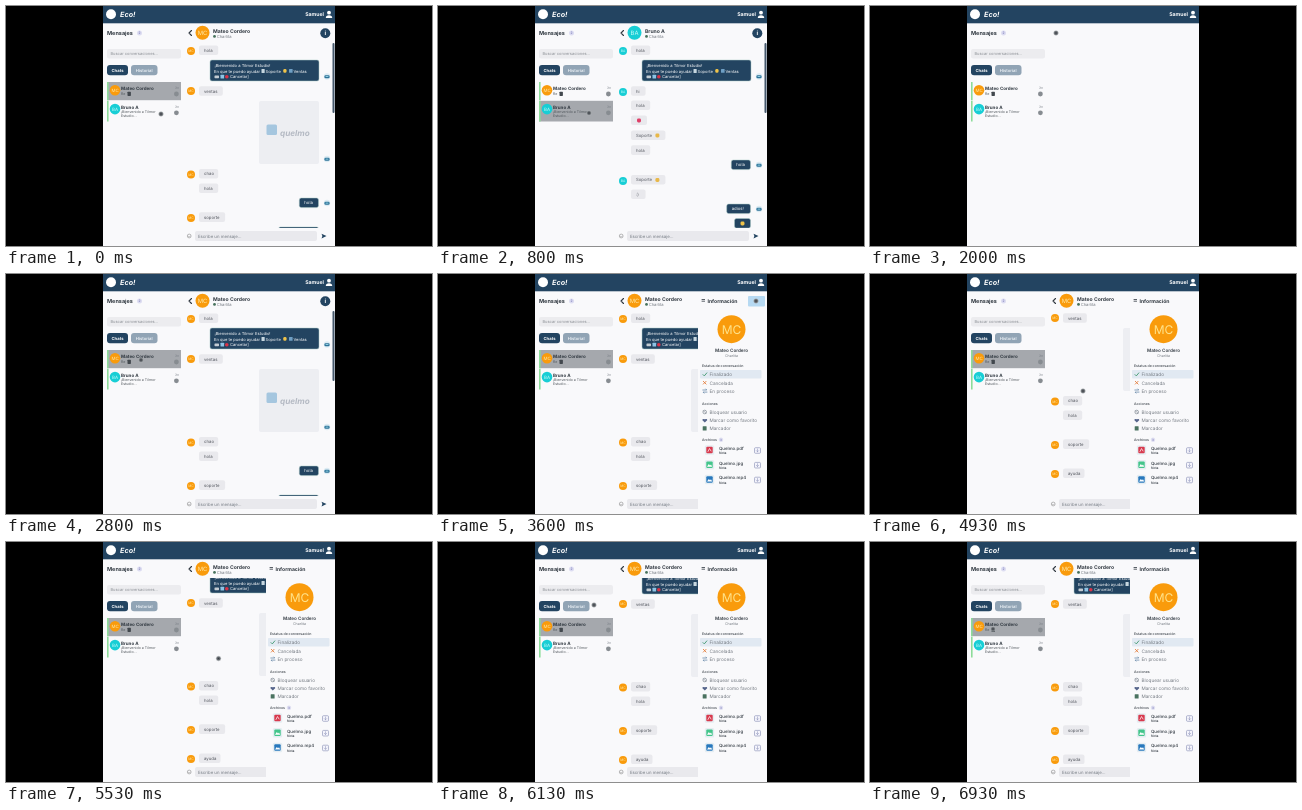
Recreate the animation shown at these times as an HTML page. Size 426 by 240 pixels, loop 6990 ms.

```html
<!DOCTYPE html>
<html lang="es">
<head>
<meta charset="utf-8">
<title>Chat</title>
<style>
html, body { margin: 0; width: 100%; height: 100%; overflow: hidden; background: #000; }
svg { display: block; width: 100%; height: 100%; }
text { font-family: Inter, Roboto, sans-serif; text-rendering: geometricPrecision; }
</style>
</head>
<body>
<svg id="stage" viewBox="0 0 426 240"></svg>
<script>
const LOOP = 6990, STEP = 1000 / 15;
const NAVY = '#234461', INK = '#303840', GREY = '#747a82', PAGE = '#f9f9fb', SOFT = '#e9e9ed';
const ORANGE = '#f99b0c', CYAN = '#18ced5';

const text = (x, y, s, size, fill = INK, weight = 400, extra = '') =>
  `<text x="${x}" y="${y}" font-size="${size}" fill="${fill}" font-weight="${weight}" ${extra}>${s}</text>`;
const rect = (x, y, w, h, fill, r = 0, extra = '') =>
  `<rect x="${x}" y="${y}" width="${w}" height="${h}" rx="${r}" fill="${fill}" ${extra}/>`;
const disc = (x, y, r, fill, extra = '') => `<circle cx="${x}" cy="${y}" r="${r}" fill="${fill}" ${extra}/>`;
const line = (d, stroke, w = 1) =>
  `<path d="${d}" fill="none" stroke="${stroke}" stroke-width="${w}" stroke-linecap="round" stroke-linejoin="round"/>`;
const group = (id, body, extra = '') => `<g id="${id}" ${extra}>${body}</g>`;
const MID = 'text-anchor="middle"', EDGE = 'stroke="#a9c9c4" stroke-width=".5"';

const people = {
  mateo: { name: 'Mateo Cordero', initials: 'MC', color: ORANGE, tint: '#ffe9a8' },
  bruno: { name: 'Bruno A', initials: 'BA', color: CYAN, tint: '#c9fbfa' }
};
const avatar = (p, x, y, r) =>
  disc(x, y, r, p.color) + text(x, y + r * .3, p.initials, r * .84, p.tint, 400, MID);

const bot = y => disc(321, y, 3.2, '#dcebf3') + rect(318.4, y - 1.3, 5.2, 3, '#2d7298', 1.3) +
  rect(319.6, y - .3, 2.8, .8, '#a9e3f1');

// The dot stands for an emoji after the label.
function bubble(y, label, right, dot) {
  const w = 10 + label.length * 2.3 + (dot ? 6 : 0);
  const x = right ? 312.5 - w : 193;
  const mark = dot ? rect(x + w - 10, y - 2, 4, 4, dot, 1.4) : '';
  return rect(x, y - 5, w, 9.6, right ? NAVY : SOFT, 2, right ? EDGE : '') +
    text(x + 5, y + 1.3, label, 4.3, right ? '#fff' : '#50545c') + mark;
}

const welcome = () => rect(204, 54, 109, 21, NAVY, 2, EDGE) +
  text(208.5, 60.5, '¡Bienvenido a Tilmor Estudio!', 4.1, '#fff') +
  text(208, 66.5, 'En que te puedo ayudar', 4.1, '#fff') + rect(255.5, 63, 3.2, 4, '#c6d6df', .5) +
  text(259.5, 66.5, 'Soporte', 4.1, '#fff') + rect(277.3, 63, 3.2, 3.8, '#efc34a', 1.3) +
  rect(283, 63, 3.6, 3.8, '#6f9fc4', .5) + text(287.5, 66.5, 'Ventas', 4.1, '#fff') +
  rect(208.5, 69.5, 4.5, 2.7, '#c3cbd2', .6) + rect(214.5, 68.8, 3.6, 3.8, '#8dc3e4', .5) +
  disc(220.8, 70.8, 1.8, '#d93347') + text(224, 72.4, 'Cancelar]', 4.1, '#fff') + bot(70.5);

const picture = () => rect(253, 95, 60, 63, '#edeef2', 2) + rect(260.5, 118.5, 10.5, 10.5, '#a5c6df', 1.5) +
  text(274, 129.5, 'quelmo', 8.2, '#b4b9c3', 700, 'font-style="italic"') + bot(153);

const header = p => line('M185.5 24.5 L183 27 L185.5 29.5', INK, 1.1) + avatar(p, 196.5, 26.7, 7) +
  text(207, 26.7, p.name, 5.1, INK, 700) + disc(208.5, 30.4, 1.4, '#46715c') + text(210.7, 31.7, 'Charlita', 4.1, GREY);

const compose = () => disc(183.2, 230, 1.9, 'none', 'stroke="#777" stroke-width=".5"') +
  line('M182.2 230.4 q1 .9 2 0', '#777', .4) + rect(189, 225, 122, 10, SOFT, 2) +
  text(192, 231.6, 'Escribe un mensaje...', 4.3, GREY) +
  `<path d="M315.5 227.7 L320.5 230 L315.5 232.4 L316.4 230 Z" fill="${NAVY}"/>`;

function chat(id, p, avatars, messages, extra) {
  const body = welcome() + extra + avatars.map(y => avatar(p, 185, y, 4)).join('') +
    messages.map(m => bubble(...m)).join('');
  return group(id, header(p) + `<g clip-path="url(#log)">${group(id + 'Log', body)}</g>` + compose() +
    disc(319.3, 27.2, 5, NAVY) + text(319.3, 29.4, 'i', 6, '#fff', 700, MID) + rect(326.5, 37, 2, 70, '#45586c', 1));
}

function row(p, id, y, h, lines) {
  return rect(101, y, 74, h, '#a5a8ad', 0, `id="${id}"`) +
    rect(101, y, 1.6, h, '#8ddc9a') + avatar(p, 109, y + 8.3, 5.3) +
    text(115, y + 7.7, p.name, 4.5, INK, 700) +
    lines.map((s, i) => text(115, y + 12.5 + i * 4, s, 3.6, '#51575d')).join('') +
    text(169, y + 7, '7m', 3, GREY) + disc(170.4, y + 12, 2.4, '#878c91');
}

const sidebar = () => text(101, 29.3, 'Mensajes', 5.5, INK, 700) + disc(133.5, 27, 2.5, '#dcdcf1') +
  text(133.5, 28.2, '2', 3.3, '#6d6db0', 400, MID) +
  rect(101, 43, 74, 9.5, '#ececef', 2) + text(104.5, 49.2, 'Buscar conversaciones...', 4, '#8b8f95') +
  rect(101, 59, 21, 10.3, NAVY, 3) + text(111.5, 65.8, 'Chats', 4.2, '#fff', 700, MID) +
  rect(125, 59, 26.5, 10.3, '#91a4b5', 3) + text(138.2, 65.8, 'Historial', 4.2, '#eef3f7', 600, MID) +
  row(people.mateo, 'pickMateo', 76, 18.2, ['Re']) + rect(121.5, 85.7, 3.4, 4.2, '#42484e', .6) +
  row(people.bruno, 'pickBruno', 94.8, 20.7, ['¡Bienvenido a Tilmor', 'Estudio...']);

const topBar = () => rect(97, 0, 232, 17.3, NAVY) + disc(105, 8.3, 5, '#fff') +
  text(114, 11.2, 'Eco!', 7.2, '#fff', 700, 'font-style="italic"') +
  text(318, 10.4, 'Samuel', 5.2, '#fff', 700, 'text-anchor="end"') + disc(323, 6.7, 1.9, '#fff') +
  '<path d="M319.8 12 q0 -2.8 3.2 -2.8 t3.2 2.8 z" fill="#fff"/>';

function file(y, ext, color) {
  const mark = ext === 'pdf' ? line(`M270 ${y + 1.5} L271.5 ${y - 1.5} L273 ${y + 1}`, '#fff', .7)
    : `<path d="M269 ${y + 2} l1.8 -2.6 l1.2 1.4 l1 -1 l1.2 2.2 z" fill="#fff"/>`;
  return rect(266.8, y - 4.7, 9.4, 9.4, '#e5edf2', 1.5) + rect(268.3, y - 3.3, 6.4, 6.6, color, 1) + mark +
    text(281, y - .2, 'Quelmo.' + ext, 4.4, INK, 500) + text(281, y + 4, 'Nota', 3.3, INK, 500) +
    rect(316.5, y - 2.3, 6, 5.6, '#f4f4fc', 1, 'stroke="#858bb2" stroke-width=".6"') +
    line(`M319.5 ${y - 1} v2.8 m-1.2 -1.2 l1.2 1.2 l1.2 -1.2`, '#858bb2', .5);
}

const options = (y, gap, labels) =>
  labels.map((s, i) => text(271.5, y + i * gap, s, 4.7, GREY)).join('');

const info = () => rect(260, 18, 69, 222, PAGE) + line('M264 25.5 h2.6 M264 27.2 h2.6', INK, .8) +
  text(269.5, 28.6, 'Información', 5.1, INK, 700) + rect(310, 22, 17, 10.5, '#b6d9f2', 1, 'id="flash"') +
  disc(293.5, 55.2, 14, ORANGE) + text(293.5, 59.5, 'MC', 12, '#ffe38b', 400, MID) +
  text(293.5, 78, 'Mateo Cordero', 4.6, INK, 600, MID) + text(293.5, 82.6, 'Charlita', 3.6, GREY, 400, MID) +
  text(264, 93.4, 'Estatus de conversación', 3.5, '#555b62', 600) + rect(262, 96, 61.5, 8.4, '#e1e9f2', 1) +
  line('M265 100.6 l1.3 1.3 l2.5 -3', '#3f9870', .9) +
  line('M265.3 107.3 l2.8 2.8 m0 -2.8 l-2.8 2.8', '#e58140', .9) +
  line('M264.8 116 h4 l-1 -1 M269 118.1 h-4 l1 1', '#587ca0', .7) +
  options(102, 8.6, ['Finalizado', 'Cancelada', 'En proceso']) +
  text(264, 130.7, 'Acciones', 3.5, '#555b62', 600) +
  disc(266.7, 138, 1.8, 'none', 'stroke="#68737e" stroke-width=".6"') + line('M265.5 136.8 l2.4 2.4', '#68737e', .5) +
  '<path d="M266.8 148.6 l-2.4 -2.4 q-.2 -2 2.4 -.9 q2.6 -1.1 2.4 .9 z" fill="#56658b"/>' +
  rect(264.7, 152.2, 3.9, 4.2, '#4a7260', .5) +
  options(139.6, 8.3, ['Bloquear usuario', 'Marcar como favorito', 'Marcador']) +
  text(264, 167, 'Archivos', 3.5, '#555b62', 600) + disc(283, 165.8, 2.2, '#dfdff1') +
  text(283, 167, '3', 3, '#6d6db0', 400, MID) +
  file(176, 'pdf', '#d83a4e') + file(190.7, 'jpg', '#43c58b') + file(205.5, 'mp4', '#2878bd');

const stage = document.getElementById('stage');
stage.innerHTML = '<clipPath id="log"><rect x="180" y="36" width="146" height="186"/></clipPath>' +
  '<clipPath id="app"><rect x="97" width="232" height="240"/></clipPath><g clip-path="url(#app)">' +
  rect(97, 0, 232, 240, PAGE) + topBar() + sidebar() +
  chat('mateo', people.mateo, [45, 85, 168.5, 212, 241],
    [[44.5, 'hola'], [85.2, 'ventas'], [168, 'chao'], [182.5, 'hola'], [197, 'hola', true],
     [211.3, 'soporte'], [226, 'Buenas tardes', true], [240.5, 'ayuda']], picture() + bot(197)) +
  chat('bruno', people.bruno, [45, 86, 175],
    [[44.5, 'hola'], [85.2, 'hi'], [99.5, 'hola'], [114.5, '', false, '#df3f68'], [129.5, 'Soporte ', false, '#e8b84a'],
     [144.3, 'hola'], [159, 'hola', true], [174, 'Soporte ', false, '#e8b84a'], [188.5, ':)'],
     [203, 'adios!', true], [217.5, '', true, '#efc34a']], bot(159) + bot(203)) +
  group('info', info()) +
  group('cursor', disc(0, 0, 2.3, '#62676c', 'stroke="#b9bcbf" stroke-width=".5"') + disc(0, 0, .8, '#383d42')) + '</g>';

// Each key is [time, ...values]; values ease between neighbouring keys.
const path = [[0, 155, 108], [800, 151, 107], [1300, 151, 107], [1800, 186, 27], [2050, 186, 27], [2600, 135, 86],
  [2900, 135, 86], [3400, 318, 27], [3700, 318, 27], [4300, 213, 117], [5500, 213, 117], [6130, 156, 63],
  [6600, 123, 87], [LOOP, 123, 87]];
const scroll = [[0, 0], [4400, 0], [4870, 41], [5130, 41], [5600, 23], [LOOP, 23]];

function at(keys, t) {
  const i = Math.max(1, keys.findIndex(k => k[0] >= t));
  const [a, b] = [keys[i - 1], keys[i]];
  const u = (t - a[0]) / (b[0] - a[0]), e = u * u * (3 - 2 * u);
  return a.slice(1).map((v, n) => v + (b[n + 1] - v) * e);
}
const el = id => document.getElementById(id);
const show = (id, on) => { el(id).style.display = on ? '' : 'none'; };

function draw(now) {
  const t = Math.floor((now % LOOP + 4) / STEP) * STEP;
  const bruno = t >= 270 && t < 1860, mateo = t < 270 || t >= 2800;
  show('bruno', bruno);
  show('pickBruno', bruno);
  show('mateo', mateo);
  show('pickMateo', mateo);
  show('info', t >= 3460);
  show('flash', t < 3800);
  el('mateoLog').setAttribute('transform', `translate(0 ${-at(scroll, t)[0]})`);
  el('cursor').setAttribute('transform', `translate(${at(path, t)})`);
  requestAnimationFrame(draw);
}
requestAnimationFrame(draw);
</script>
</body>
</html>
```
